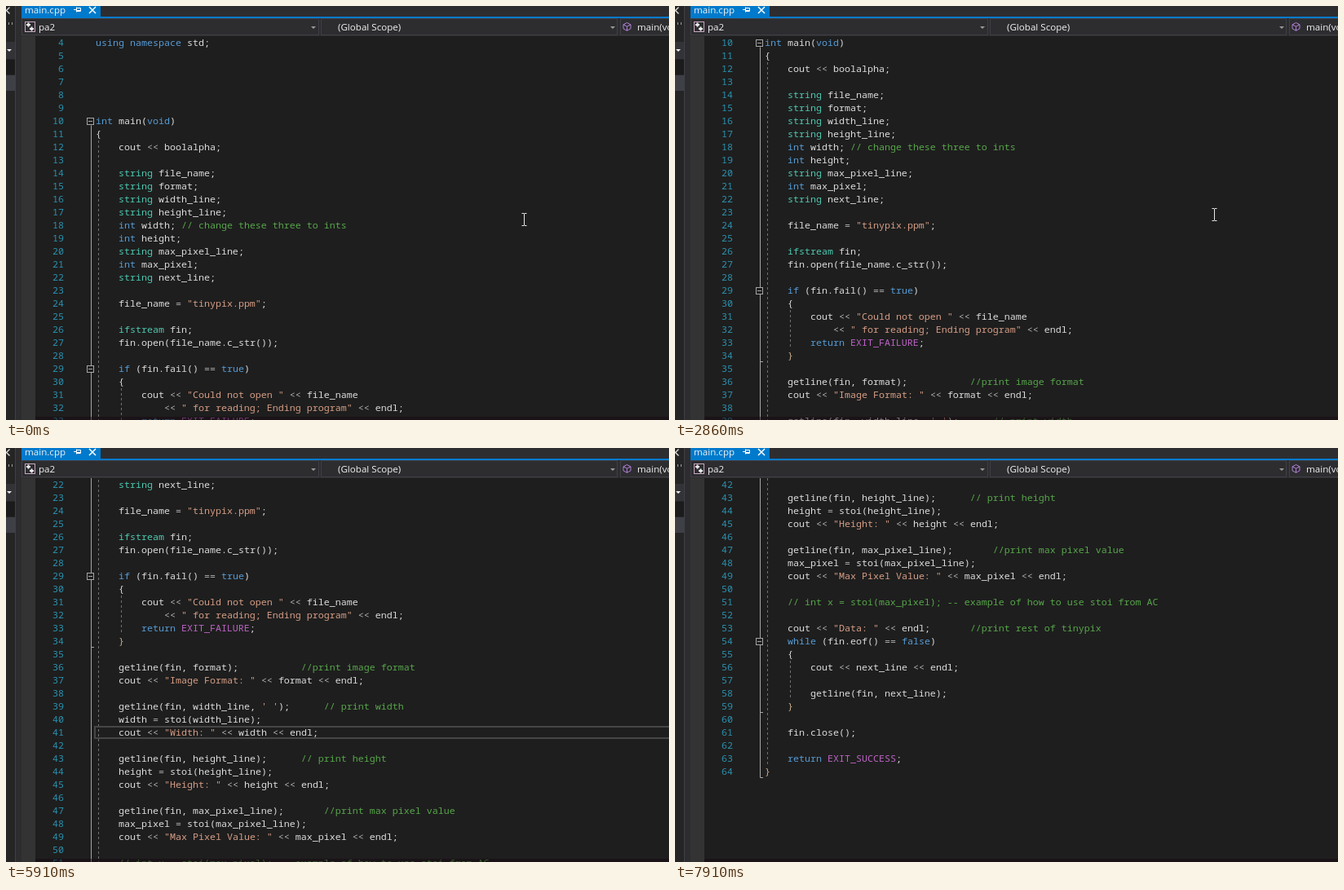
These frames come from a looping animation (813 by 508 pixels, 8 s). An HTML page:

```html
<!DOCTYPE html>
<html lang="en">
<head>
<meta charset="utf-8">
<title>Code editor scrolling</title>
<style>
  html, body { margin: 0; width: 100%; height: 100%; overflow: hidden; background: #1e1e1e; }
  svg { display: block; width: 813px; height: 508px; }
  text { white-space: pre; }
  .code text { font: 11.667px "Noto Sans Mono", monospace; fill: #dcdcdc; }
  .ui text { font: 11.6px "Open Sans", sans-serif; fill: #f1f1f1; }
  .code .num { fill: #2b91af; text-anchor: end; }
  .kw { fill: #569cd6; }
  .type { fill: #4ec9b0; }
  .str { fill: #d69d85; }
  .com { fill: #57a64a; }
  .mac { fill: #bd63c5; }
  .op { fill: #b4b4b4; }
  .end { fill: #c8b08c; }
  .fold { fill: none; stroke: #a5a5a5; }
  .guide { stroke: #707070; stroke-dasharray: 3 3; }
</style>
</head>
<body>
<svg viewBox="0 0 813 508">
  <defs><clipPath id="pane"><rect x="36" y="37" width="777" height="471"/></clipPath></defs>
  <rect width="813" height="508" fill="#1e1e1e"/>
  <g clip-path="url(#pane)"><g id="sheet" class="code"></g></g>
  <rect x="36" y="504" width="777" height="4" fill="#14050f" opacity=".45"/>

  <g class="ui">
    <rect width="813" height="37" fill="#2d2d30"/>
    <rect width="11" height="508" fill="#252526"/>
    <rect x="11" width="8" height="508" fill="#2d2d30"/>
    <path d="M11.5 0V508" stroke="#3f3f46"/>
    <rect x="19" y="37" width="17" height="471" fill="#333333"/>
    <rect y="44" width="11" height="21" fill="#333337"/>
    <rect y="66" width="11" height="18" fill="#1b1b1c"/>
    <rect y="85" width="11" height="19" fill="#3f3f46"/>
    <path d="M4.5 1.5L0.5 5.5L4.5 9.5" fill="none" stroke="#dcdcdc" stroke-width="1.4"/>
    <path d="M3.5 20v3M7.5 20v3" stroke="#a0a0a0"/>
    <path d="M1 53h6l-3 3z" fill="#f1f1f1"/>

    <path d="M19 0H116V13H813V15H19z" fill="#007acc"/>
    <text x="23" y="9">main.cpp</text>
    <path d="M83 4.5h3M86.5 1.5v6M87 2.5h4.5v4H87M87 5.5h4" fill="none" stroke="#fff"/>
    <path d="M102 1l8 8M110 1l-8 8" stroke="#fff" stroke-width="1.5"/>

    <g fill="#2d2d30" stroke="#3f3f46">
      <rect x="19.5" y="15.5" width="364" height="20"/>
      <rect x="386.5" y="15.5" width="363" height="20"/>
      <rect x="753.5" y="15.5" width="70" height="20"/>
    </g>
    <path d="M374 25h6l-3 3zM741 25h6l-3 3z" fill="#999"/>
    <rect x="23.5" y="19.5" width="12" height="12" fill="#2d2d30" stroke="#c8a8c0"/>
    <path d="M25 23h5M27.5 20.5v5M29 28h5M31.5 25.5v5" stroke="#f1f1f1" stroke-width="2"/>
    <path d="M761.5 20.5l4.5 2.3v5L761.5 30.300l-4.500-2.500v-5zM757 22.800l4.500 2.300l4.500-2.300M761.500 25.100v5" fill="none" stroke="#b180d7"/>
    <text x="40" y="30">pa2</text>
    <text x="407" y="30">(Global Scope)</text>
    <text x="774" y="30">main(void)</text>
  </g>

  <path id="mouse" d="M-3 -7.500h2.500l.5 .5l.5-.5h2.500M0 -7V7M-3 7.500h2.500l.5-.5l.5 .5h2.500" fill="none" stroke="#e8e8e8"/>
</svg>

<script>
const FIRST_LINE = 4, ROW = 16, LOOP = 8000, CURRENT = 41;
const source = `using namespace std;





int main(void)
{
    cout << boolalpha;

    string file_name;
    string format;
    string width_line;
    string height_line;
    int width; // change these three to ints
    int height;
    string max_pixel_line;
    int max_pixel;
    string next_line;

    file_name = "tinypix.ppm";

    ifstream fin;
    fin.open(file_name.c_str());

    if (fin.fail() == true)
    {
        cout << "Could not open " << file_name
            << " for reading; Ending program" << endl;
        return EXIT_FAILURE;
    }

    getline(fin, format);           //print image format
    cout << "Image Format: " << format << endl;

    getline(fin, width_line, ' ');      // print width
    width = stoi(width_line);
    cout << "Width: " << width << endl;

    getline(fin, height_line);      // print height
    height = stoi(height_line);
    cout << "Height: " << height << endl;

    getline(fin, max_pixel_line);       //print max pixel value
    max_pixel = stoi(max_pixel_line);
    cout << "Max Pixel Value: " << max_pixel << endl;

    // int x = stoi(max_pixel); -- example of how to use stoi from AC

    cout << "Data: " << endl;       //print rest of tinypix
    while (fin.eof() == false)
    {
        cout << next_line << endl;

        getline(fin, next_line);
    }

    fin.close();

    return EXIT_SUCCESS;
}`;

// [time in ms, value]
const scrollSteps = [
  [0, 4], [930, 7], [1210, 10], [2170, 13], [2860, 10], [2980, 7], [3410, 10],
  [5190, 11], [5340, 13], [5500, 15], [5640, 17], [5760, 20], [5910, 22],
  [6060, 24], [6180, 27], [6310, 29], [6710, 30], [6860, 32], [7110, 33],
  [7230, 34], [7500, 35], [7630, 36], [7780, 39], [7910, 42]
];
const mouseSteps = [[0, [635.5, 262]], [120, [661.5, 256]], [4220, null]];
const caretSteps = [[0, false], [5190, true], [5640, false], [6060, true], [6560, false], [7110, true], [7630, false]];

const sheet = document.getElementById("sheet");
const mouse = document.getElementById("mouse");
const rowTop = line => line * ROW;

function add(tag, attrs, parent = sheet, content = "") {
  const node = document.createElementNS("http://www.w3.org/2000/svg", tag);
  for (const key in attrs) node.setAttribute(key, attrs[key]);
  node.textContent = content;
  return parent.appendChild(node);
}

const rules = [
  ["com", /^\/\/.*/],
  ["str", /^("[^"]*"|'[^']*')/],
  ["kw", /^(using|namespace|int|void|if|while|return|true|false)\b/],
  ["type", /^(string|ifstream)\b/],
  ["mac", /^EXIT_\w+/],
  ["op", /^(<<|==|=)/],
  ["end", /^}/],
  ["", /^(\w+|\s+|.)/]
];

function drawCode(text, line) {
  const y = rowTop(line) + 12;
  add("text", { x: 71, y, class: "num" }, sheet, line);
  const node = add("text", { x: 110, y });
  while (text) {
    const [name, rule] = rules.find(([, re]) => re.test(text));
    const token = text.match(rule)[0];
    add("tspan", { class: name }, node, token);
    text = text.slice(token.length);
  }
}

function drawGuide(x, from, to) {
  add("path", { d: `M${x} ${rowTop(from)}V${rowTop(to + 1)}`, class: "guide" });
}

function drawFold(from, to) {
  const y = rowTop(from) + 8.5, end = rowTop(to) + 15.5;
  add("path", { d: `M104.5 ${y + 5}V${end}H108`, class: "fold" });
  add("rect", { x: 99.5, y: y - 4, width: 8, height: 8, class: "fold", style: "fill:#1e1e1e" });
  add("path", { d: `M101 ${y}H106`, class: "fold" });
}

drawGuide(113.5, 12, 63);
drawGuide(141.5, 31, 33);
drawGuide(141.5, 56, 58);
drawFold(10, 64);
drawFold(29, 34);
drawFold(54, 59);
add("rect", { x: 109, y: rowTop(CURRENT) + 1, width: 800, height: 14, fill: "none", stroke: "#464646", "stroke-width": 2 });
source.split("\n").forEach((text, i) => drawCode(text, FIRST_LINE + i));
const caret = add("rect", { x: 383, y: rowTop(CURRENT), width: 1, height: 15, fill: "#dcdcdc" });

const valueAt = (steps, t) => steps.findLast(([start]) => start <= t)[1];
const show = (node, on) => node.setAttribute("visibility", on ? "visible" : "hidden");

function draw(now) {
  const t = now % LOOP;
  sheet.setAttribute("transform", `translate(0 ${37 - rowTop(valueAt(scrollSteps, t))})`);
  const spot = valueAt(mouseSteps, t);
  show(mouse, spot);
  if (spot) mouse.setAttribute("transform", `translate(${spot})`);
  show(caret, valueAt(caretSteps, t));
}

let begin;
function tick(now) {
  begin ??= now;
  draw(Math.max(0, now - begin));
  requestAnimationFrame(tick);
}
draw(0);
requestAnimationFrame(tick);
</script>
</body>
</html>
```
